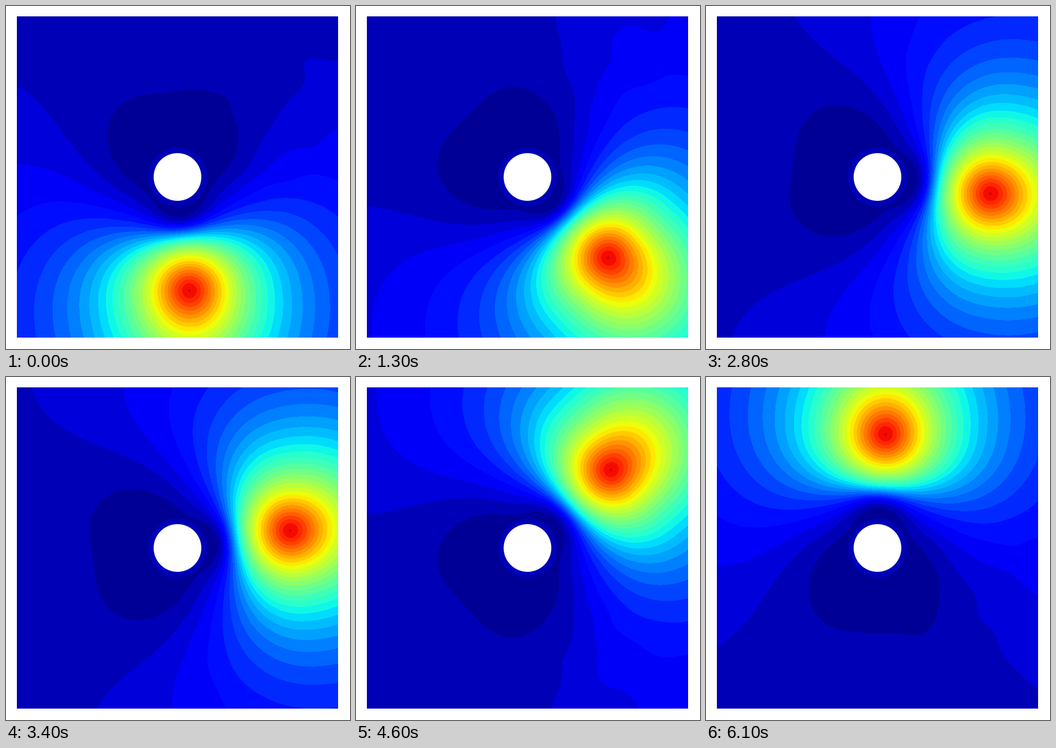
A matplotlib script that plays this animation: 664x662 px, repeating every 6.2 s.

```python
import numpy as np
import matplotlib.pyplot as plt
from matplotlib.animation import FuncAnimation
from matplotlib.colors import ListedColormap
from matplotlib.patches import Circle

W, H, DPI = 664, 662, 100
LEFT, TOP, SIDE = 21, 20, 620
CX, CY = 331, 330
FRAMES, INTERVAL = 62, 100
HOLE, RING = 46, 57
BANDS = 33
ORBIT, PEAK = 220, 31.2

cols = np.arange(SIDE, dtype=np.float32) + 0.5
X, Y = np.meshgrid(LEFT + cols - CX, CY - TOP - cols)
R = np.hypot(X, Y)

# Static unevenness on the right-hand side
RIPPLE = (0.07 / (1 + np.exp((60 - X) / 20))
          * np.sin(X / 27 + 1.3 * np.sin(Y / 37))
          * np.sin(Y / 31 + 0.8 * np.sin(X / 45)))


def smooth(v, lo, hi):
    t = np.clip((v - lo) / (hi - lo), 0, 1)
    return t * t * (3 - 2 * t)


def heading(step):
    """Direction of the hot spot: a half turn that slows a little on the right."""
    return np.radians(np.interp(step, [0, 13, 28, FRAMES - 1], [-84, -45, -8.4, 86]))


def field(step):
    """Value in units of one colour band."""
    angle = float(heading(step))
    ux, uy = np.cos(angle), np.sin(angle)
    along = X * ux + Y * uy
    across = Y * ux - X * uy
    out = along - ORBIT
    c = along / R

    dist = np.hypot(out, across)
    v = PEAK / (1 + (dist / 122.6) ** 1.54)

    # The outer walls hold the heat in, most of all in the corners
    spread = 0.12 + 0.3 * abs(np.sin(2 * angle))
    reach = np.clip(out, 0, None)
    v *= 1 + spread * (1 - np.exp(-(reach / 120) ** 2)) * np.exp(-(across / 220) ** 2)

    # Shadow cast by the cylinder, sharp in front and soft behind
    mid = np.exp(5.27 - 0.61 * c + 0.02 * c ** 2)
    steep = np.exp(0.93 - 0.144 * c + 0.33 * c ** 2 + 0.934 * c ** 3)
    v /= 1 + (mid / R) ** steep

    v *= 1 + RIPPLE * smooth(-c, -0.4, 0.2)
    return np.where(R < RING, 1.5, v)


def bands(step):
    return np.clip(np.floor(field(step)), 0, BANDS - 1)


fig = plt.figure(figsize=(W / DPI, H / DPI), dpi=DPI, facecolor="white")
ax = fig.add_axes([LEFT / W, 1 - (TOP + SIDE) / H, SIDE / W, SIDE / H])
ax.set_axis_off()

cmap = ListedColormap(plt.get_cmap("jet")(0.02 + 0.0292 * np.arange(BANDS)))
image = ax.imshow(bands(0), cmap=cmap, vmin=-0.5, vmax=BANDS - 0.5,
                  interpolation="nearest", aspect="auto",
                  extent=(LEFT, LEFT + SIDE, TOP + SIDE, TOP))
ax.add_patch(Circle((CX, CY), HOLE, color="white", lw=0))


def update(step):
    image.set_data(bands(step))
    return image,


anim = FuncAnimation(fig, update, frames=FRAMES, interval=INTERVAL,
                     repeat=True, repeat_delay=0)
plt.show()
```
